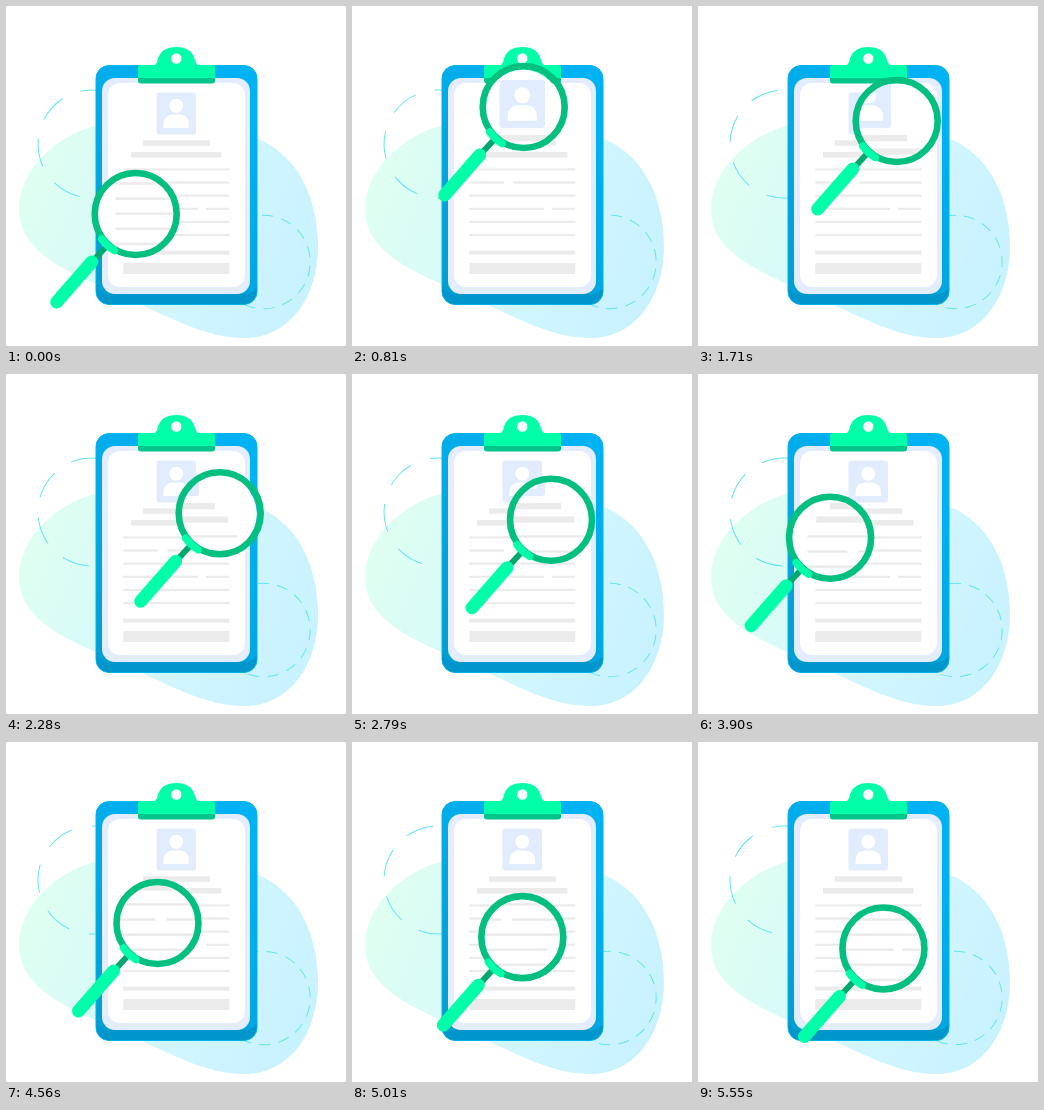
Write an HTML page that moves like this. It is 340x340 px and loops after 5580 ms.

```html
<!DOCTYPE html>
<html lang="en">
<head>
<meta charset="utf-8">
<title>Document search</title>
<style>
html, body { margin: 0; width: 100%; height: 100%; overflow: hidden; background: #fff; }
svg { display: block; width: 100vw; height: 100vh; }
</style>
</head>
<body>
<svg viewBox="0 0 340 340">
  <defs>
    <linearGradient id="blobFill" x1="0" y1="0.3" x2="1" y2="0.6">
      <stop offset="0" stop-color="#e0fff1"/>
      <stop offset="0.7" stop-color="#cff5ff"/>
      <stop offset="1" stop-color="#c9f2ff"/>
    </linearGradient>
    <linearGradient id="boardFill" x1="0" y1="1" x2="0.6" y2="0">
      <stop offset="0" stop-color="#009dd0"/>
      <stop offset="1" stop-color="#00b2f4"/>
    </linearGradient>
    <clipPath id="glass"><circle id="glassShape" cx="-0.8" cy="0.5" r="38"/></clipPath>
    <g id="content">
      <rect x="150.5" y="86.5" width="39.5" height="42" rx="3" fill="#e1ecff"/>
      <circle cx="170.3" cy="99.8" r="7" fill="#fff"/>
      <path d="M157.5 122v-4.5a9 9 0 0 1 9-9h7.5a9 9 0 0 1 9 9v4.5z" fill="#fff"/>
      <g id="lines" fill="#ebebeb"></g>
    </g>
  </defs>

  <path fill="url(#blobFill)" d="M92 119C48 130 13 165 13 203C13 247 62 266 108 286C158 308 196 332 239 332C284 332 312 290 312 241C312 186 288 147 250 132C200 108 140 106 92 119Z"/>
  <g fill="none" stroke="#62e6f2">
    <circle id="leftRing" cx="86" cy="138" r="54"/>
    <circle id="rightRing" cx="257.5" cy="256" r="46.7"/>
  </g>

  <rect x="90" y="59.5" width="161" height="239" rx="13" fill="url(#boardFill)" stroke="#00b4ea"/>
  <path d="M90.5 278v7a13 13 0 0 0 13 13h134a13 13 0 0 0 13-13v-7q0 10-13 10h-134q-13 0-13-10z" fill="#0096cb"/>
  <rect x="96" y="72" width="148" height="216" rx="13" fill="#e3edff"/>
  <rect x="102" y="77" width="137" height="204" rx="12" fill="#fff"/>
  <use href="#content"/>

  <path fill="#00ffa8" d="M147 60C152 58 151 54 153 50C156 44 162 41 170.3 41C178.500 41 185 44 187.5 50C189.5 54 189 58 194 60Z"/>
  <circle cx="170.3" cy="52.5" r="5.2" fill="#fff"/>
  <rect x="132" y="59" width="77" height="18.5" rx="3" fill="#00c687"/>
  <path d="M132 72V62a3 3 0 0 1 3-3h71a3 3 0 0 1 3 3v10z" fill="#00ffa8"/>

  <g clip-path="url(#glass)">
    <rect width="340" height="340" fill="#fff"/>
    <use href="#content" transform="translate(170 170) scale(1.15) translate(-170 -170)"/>
  </g>
  <g id="loupe" fill="none">
    <path d="M-29 32L-41 45" stroke="#00a870" stroke-width="6"/>
    <circle r="41" stroke="#03bf80" stroke-width="6.6"/>
    <path d="M-34 25A42 42 0 0 0 -21.5 36.5" stroke="#00ffa8" stroke-width="7.5" stroke-linecap="round"/>
    <path d="M-44 48L-79 88" stroke="#00ffa8" stroke-width="13" stroke-linecap="round"/>
  </g>
</svg>
<script>
const LOOP = 5580, STEP = 30;
const get = id => document.getElementById(id);

const left = 117.3, right = 223.3;
const bar = (x1, x2, y, h) => `<rect x="${x1}" y="${y}" width="${x2 - x1}" height="${h}"/>`;

function textRows() {
  let out = bar(137, 204, 134.3, 5.5) + bar(125, 215.5, 146, 5.5);
  for (let i = 0; i < 6; i++) {
    const y = 162.3 + i * 13.13;
    // Every second row up to the fourth is split by a gap
    const gap = i === 1 ? [152, 161.5] : i === 3 ? [192, 200] : [right, right];
    out += bar(left, gap[0], y, 2.2) + bar(gap[1], right, y, 2.2);
  }
  return out + bar(left, right, 244.5, 4.2) + bar(left, right, 257, 11);
}
get("lines").innerHTML = textRows();

// Key poses of the lens
const keys = [
  { t: 0, x: 129.7, y: 208 },
  { t: 810, x: 171.7, y: 101 },
  { t: 1080, x: 179, y: 99.5 },
  { t: 1710, x: 198.7, y: 115 },
  { t: 2280, x: 213.7, y: 139.3 },
  { t: 3240, x: 175.7, y: 150.7 },
  { t: 3980, x: 131, y: 165.5 },
  { t: 4560, x: 151.5, y: 181 },
  { t: LOOP, x: 185.5, y: 206.5 }
];

const slope = (a, b, axis) => (b[axis] - a[axis]) / (b.t - a.t);

// Monotone tangent: the lens rests at the ends and at each turning point
function tangent(i, axis) {
  if (i === 0 || i === keys.length - 1) return 0;
  const a = slope(keys[i - 1], keys[i], axis), b = slope(keys[i], keys[i + 1], axis);
  return a * b <= 0 ? 0 : 2 * a * b / (a + b);
}

function along(t, axis) {
  const next = keys.findIndex(key => key.t > t);
  const from = keys[next - 1], to = keys[next];
  const span = to.t - from.t, s = (t - from.t) / span, r = 1 - s;
  return from[axis] * r * r * (1 + 2 * s) + to[axis] * s * s * (3 - 2 * s)
    + span * s * r * (r * tangent(next - 1, axis) - s * tangent(next, axis));
}

// Returns a function that turns the ring by a number of dash periods
function dashRing(id, count, startAngle) {
  const ring = get(id), dash = 0.58;
  const period = 2 * Math.PI * ring.getAttribute("r") / count;
  ring.setAttribute("stroke-dasharray", `${period * dash} ${period * (1 - dash)}`);
  const centre = `${ring.getAttribute("cx")} ${ring.getAttribute("cy")}`;
  return turns => ring.setAttribute("transform",
    `rotate(${startAngle + turns * 360 / count} ${centre})`);
}
const rings = [dashRing("leftRing", 7, -102), dashRing("rightRing", 15, -92)];

function draw(elapsed) {
  const t = Math.floor(elapsed % LOOP / STEP) * STEP;
  const place = `translate(${along(t, "x")} ${along(t, "y")})`;
  get("loupe").setAttribute("transform", place);
  get("glassShape").setAttribute("transform", place);
  rings.forEach(turn => turn(3 * (t / LOOP) ** 1.5));
}

const start = performance.now();
function tick() {
  draw(performance.now() - start);
  requestAnimationFrame(tick);
}
draw(0);
requestAnimationFrame(tick);
</script>
</body>
</html>
```
